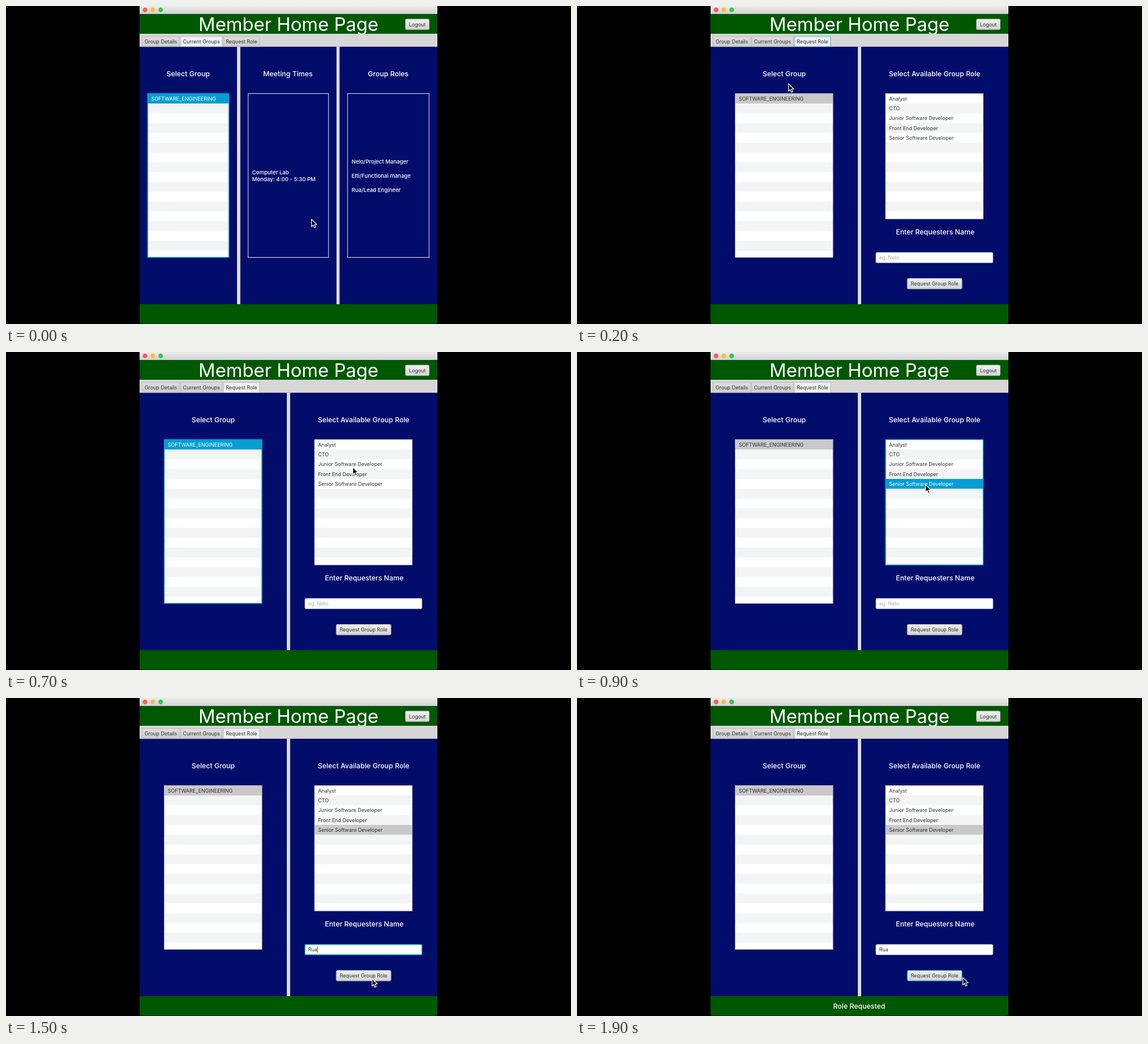
Write an HTML page that moves like this. It is 998x561 px and loops after 2 s.

```html
<!DOCTYPE html>
<html lang="en">
<head>
<meta charset="utf-8">
<title>Member Home Page</title>
<style>
  html, body { margin: 0; width: 100%; height: 100%; overflow: hidden; background: #000; }
  svg { display: block; width: 998px; height: 561px; }
  text { font-family: Inter, "Open Sans", sans-serif; font-size: 9px; fill: #333; white-space: pre; }
  .title { font-size: 32.8px; fill: #fff; text-anchor: middle; }
  .head { font-size: 12.35px; font-weight: 500; fill: #fff; text-anchor: middle; }
  .label { font-size: 9.6px; font-weight: 500; fill: #fff; }
  .mid { text-anchor: middle; }
</style>
</head>
<body>
<svg id="stage" viewBox="0 0 998 561">
  <defs>
    <linearGradient id="bar" x2="0" y2="1"><stop stop-color="#ebebeb"/><stop offset="1" stop-color="#d2d2d2"/></linearGradient>
    <linearGradient id="btn" x2="0" y2="1"><stop stop-color="#f0f0f0"/><stop offset="1" stop-color="#d3d3d3"/></linearGradient>
    <linearGradient id="tab" x2="0" y2="1"><stop stop-color="#dedede"/><stop offset="1" stop-color="#cbcbcb"/></linearGradient>
    <linearGradient id="split"><stop stop-color="#c8c8c8"/><stop offset=".3" stop-color="#e4e4e4"/><stop offset="1" stop-color="#cfcfcf"/></linearGradient>
    <clipPath id="frame"><rect x="236" y="-6" width="526" height="566.5" rx="3"/></clipPath>
  </defs>
</svg>
<script>
const stage = document.getElementById('stage');
const BLUE = '#039ed3', GREEN = '#005800', NAVY = '#020c6a', GREY = '#c9c9c9';
const ROW = 17.3;

function add(parent, tag, attrs = {}, content) {
  const node = document.createElementNS(stage.namespaceURI, tag);
  set(node, attrs);
  if (content !== undefined) node.textContent = content;
  return parent.appendChild(node);
}
function set(node, attrs) {
  for (const key in attrs) node.setAttribute(key, attrs[key]);
}
const show = (node, on) => { node.style.display = on ? '' : 'none'; };
const rect = (p, x, y, width, height, fill, extra) =>
  add(p, 'rect', { x, y, width, height, fill, ...extra });
const label = (p, x, y, str, cls = '') => add(p, 'text', { x, y, class: cls }, str);
const outline = (p, x, y, w, h, stroke) => rect(p, x, y, w, h, 'none', { stroke });

function button(p, x, y, w, h, str) {
  const box = rect(p, x, y, w, h, 'url(#btn)', { rx: 2, stroke: '#aaa' });
  label(p, x + w / 2, y + h / 2 + 3.3, str, 'mid');
  return box;
}

// A striped list; select(row, focused) paints the chosen row and the border.
function list(p, x, y, w, h, items) {
  rect(p, x, y, w, h, '#fff');
  const top = y + 0.2;
  for (let i = 1; i * ROW < h; i += 2) {
    rect(p, x, top + i * ROW, w, Math.min(ROW, h - i * ROW), '#f2f4f6');
  }
  const mark = rect(p, x, top, w, ROW, GREY);
  const texts = items.map((s, i) => label(p, x + 6.2, top + i * ROW + 12, s));
  const edge = outline(p, x, y, w, h, GREY);
  return {
    select(row, focused) {
      show(mark, row >= 0);
      set(mark, { y: top + Math.max(row, 0) * ROW, fill: focused ? BLUE : GREY });
      texts.forEach((t, i) => { t.style.fill = focused && i === row ? '#fff' : '#333'; });
      set(edge, { stroke: focused ? BLUE : '#bfbfc6', 'stroke-width': focused ? 1.4 : 1 });
    }
  };
}

// Window frame
const win = add(stage, 'g', { 'clip-path': 'url(#frame)' });
rect(win, 236, 0, 526, 561, NAVY);
rect(win, 236, 0, 526, 14.3, 'url(#bar)');
['#fc5b57', '#fdbc40', '#34c84a'].forEach((fill, i) =>
  add(win, 'circle', { cx: 245.6 + i * 13.8, cy: 6.9, r: 4.2, fill }));
rect(win, 236, 14.3, 526, 35, GREEN);
label(win, 499, 44, 'Member Home Page', 'title');
button(win, 705.5, 23, 42, 18.7, 'Logout');
rect(win, 236, 49, 526, 23, '#d7d7d7');
rect(win, 236, 71, 526, 1, '#bcbcbc');
rect(win, 236, 526, 526, 35, GREEN);
const notice = label(win, 498.5, 548, 'Role Requested', 'head');

const tabs = [['Group Details', 240.5, 66], ['Current Groups', 308.5, 73.5], ['Request Role', 384, 64]]
  .map(([name, x, w]) => {
    const box = rect(win, x, 53.7, w, 18, 'url(#tab)', { stroke: '#b9b9b9' });
    label(win, x + w / 2, 66.4, name, 'mid');
    return box;
  });

// Current Groups page
const groups = add(win, 'g');
rect(groups, 408, 72, 6, 454, 'url(#split)');
rect(groups, 583.7, 72, 5.6, 454, 'url(#split)');
label(groups, 321.7, 124.4, 'Select Group', 'head');
label(groups, 498, 124.4, 'Meeting Times', 'head');
label(groups, 675, 124.4, 'Group Roles', 'head');
list(groups, 250.2, 154.5, 143.6, 289, ['SOFTWARE_ENGINEERING']).select(0, true);
outline(groups, 427.7, 154.5, 142, 289, '#e8e8f0');
outline(groups, 603.3, 154.5, 144, 289, '#e8e8f0');
label(groups, 434.8, 296.8, 'Computer Lab', 'label');
label(groups, 434.8, 309.2, 'Monday: 4:00 - 5:30 PM', 'label');
['Nelo/Project Manager', 'Elti/Functional manage', 'Rua/Lead Engineer'].forEach((s, i) =>
  label(groups, 610.5, 278 + i * 24.9, s, 'label'));

// Request Role page
const request = add(win, 'g');
rect(request, 496, 72, 6, 454, 'url(#split)');
label(request, 366, 124.4, 'Select Group', 'head');
label(request, 631.7, 124.4, 'Select Available Group Role', 'head');
label(request, 632.7, 402.8, 'Enter Requesters Name', 'head');
const groupList = list(request, 279.5, 154.5, 172.5, 289, ['SOFTWARE_ENGINEERING']);
const roleList = list(request, 545, 154.5, 172.5, 221.2,
  ['Analyst', 'CTO', 'Junior Software Developer', 'Front End Developer', 'Senior Software Developer']);
const field = rect(request, 528, 434.8, 206.7, 18.2, '#fff', { rx: 2 });
const entry = label(request, 533.7, 447.2, '');
const caret = rect(request, 534, 438.4, 0.8, 11, '#333');
const submit = button(request, 583.3, 480.6, 96.7, 18.5, 'Request Group Role');

// Pointers
const arrow = add(stage, 'path', {
  d: 'M.6 1.2V14.2L3.6 11.4L5.7 16.2L8 15.2L5.9 10.5H9.9Z',
  fill: '#000', stroke: '#fff', 'stroke-width': 1.2, 'stroke-linejoin': 'round'
});
const beam = add(stage, 'g');
for (const [stroke, width] of [['#fff', 2.6], ['#000', 1.1]]) {
  add(beam, 'path', {
    d: 'M-3 -7Q0 -7 0 -5Q0 -7 3 -7M0 -5V5M-3 7Q0 7 0 5Q0 7 3 7M-1.8 2.5H1.8',
    fill: 'none', stroke, 'stroke-width': width
  });
}

const STEP = 100, LOOP = 2000;
// Steps at which the interface reacts
const OPEN_TAB = 2, PICK_GROUP = 4, PICK_ROLE = 9, FOCUS_FIELD = 12, LEAVE_FIELD = 15, SUBMIT = 16;

// Pointer stops: step, x, y
const stops = [
  [0, 539, 375], [1, 415, 64], [2, 373, 136], [3, 345, 161], [4, 345, 161],
  [7, 612, 202], [9, 615, 233], [10, 615, 235], [12, 625, 445], [14, 625, 445],
  [15, 646, 494], [16, 646, 494], [18, 681, 492], [20, 681, 492]
];

function pointerAt(step) {
  const i = stops.findIndex(([s]) => s > step);
  const [s0, x0, y0] = stops[i - 1], [s1, x1, y1] = stops[i];
  const t = (step - s0) / (s1 - s0), eased = t * t * (3 - 2 * t);
  return [x0 + (x1 - x0) * eased, y0 + (y1 - y0) * eased];
}

function draw(step) {
  const between = (a, b) => step >= a && step < b;
  const requesting = step >= OPEN_TAB;
  const entered = step >= FOCUS_FIELD;
  const typing = between(FOCUS_FIELD, SUBMIT);

  show(groups, !requesting);
  show(request, requesting);
  tabs.forEach((tab, i) => set(tab, {
    fill: i === (requesting ? 2 : 1) ? '#eff0f1' : 'url(#tab)',
    stroke: i === 2 && between(OPEN_TAB, PICK_GROUP) ? '#55b2d8' : '#b9b9b9'
  }));

  groupList.select(0, between(PICK_GROUP, PICK_ROLE));
  roleList.select(step >= PICK_ROLE ? 4 : -1, between(PICK_ROLE, FOCUS_FIELD));

  const name = 'Rua'.slice(0, Math.max(0, step - FOCUS_FIELD));
  entry.textContent = entered ? name : 'eg. Nelo';
  entry.style.fill = entered ? '#333' : '#acacac';
  set(field, { stroke: typing ? BLUE : '#c4c4c8', 'stroke-width': typing ? 1.3 : 0.8 });
  show(caret, typing);
  if (typing) set(caret, { x: 533.8 + (name ? entry.getComputedTextLength() : 0) });

  set(submit, { stroke: step >= SUBMIT ? BLUE : '#aaa' });
  show(notice, step >= SUBMIT);

  const inField = between(FOCUS_FIELD, LEAVE_FIELD);
  show(arrow, !inField);
  show(beam, inField);
  set(inField ? beam : arrow, { transform: `translate(${pointerAt(step)})` });
}

let shown = -1;
const start = performance.now();
function tick(now) {
  const step = Math.floor((Math.max(0, now - start) % LOOP) / STEP);
  if (step !== shown) draw(shown = step);
  requestAnimationFrame(tick);
}
draw(shown = 0);
requestAnimationFrame(tick);
</script>
</body>
</html>
```
